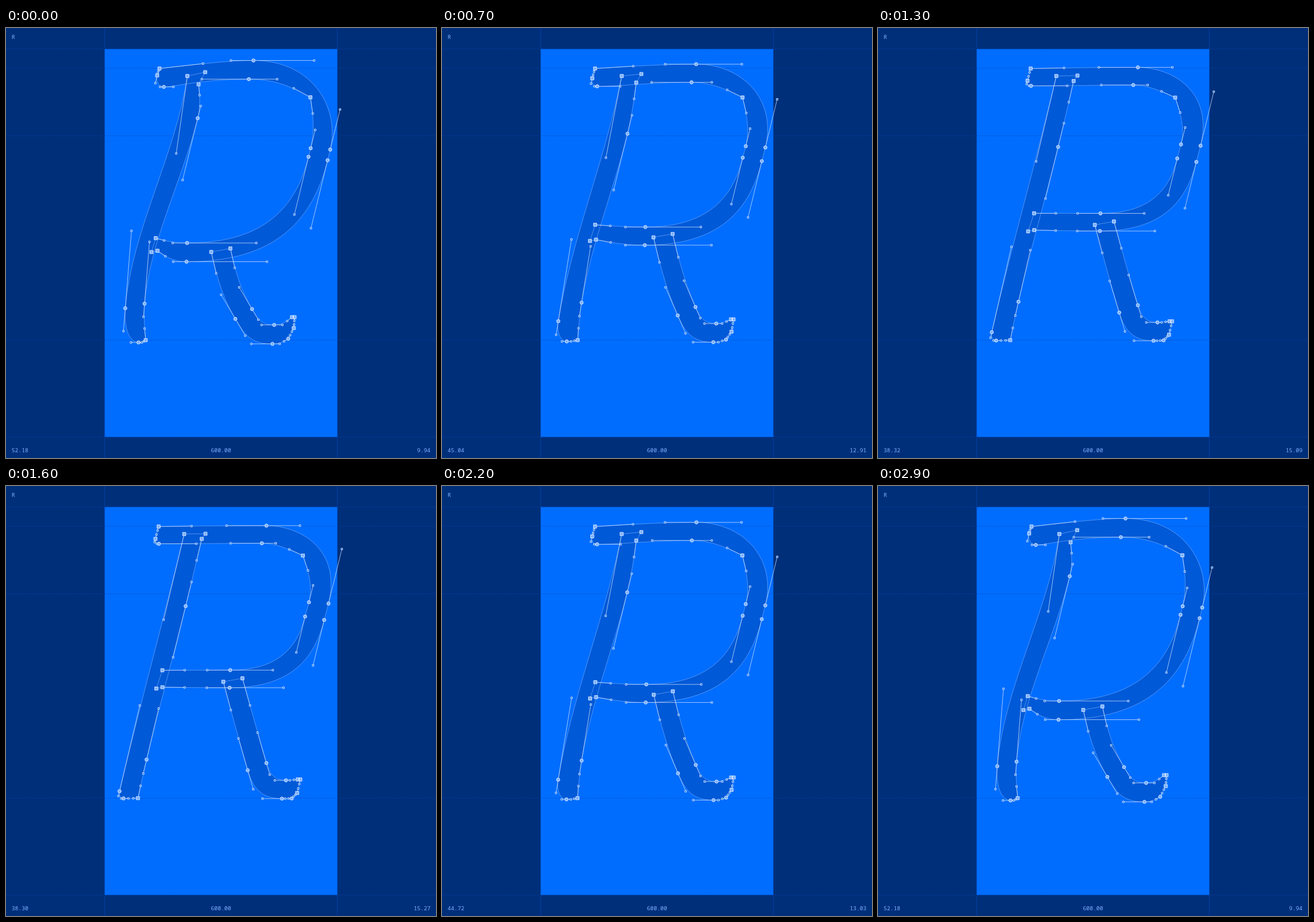
Write an HTML page that moves like this. It is 748 by 748 pixels and loops after 3 s.

```html
<!DOCTYPE html>
<html lang="en">
<head>
<meta charset="utf-8">
<title>Glyph outline</title>
<style>
  html, body { margin: 0; width: 100%; height: 100%; overflow: hidden; background: #002f7a; }
  svg { display: block; width: 100vw; height: 100vh; }
  text { font: 500 9.72px "Noto Sans Mono", "DejaVu Sans Mono", monospace; fill: #7fb0ff; }
  .guide { stroke: #0046ad; stroke-width: .75; fill: none; }
  .dots { stroke-dasharray: 1.5 1.5; }
  #fill { fill: #0059d7; }
  #outline { fill: none; stroke: #8fbcff; stroke-width: .75; stroke-opacity: .75; }
  #arms { fill: none; stroke: #d6e6ff; stroke-width: .75; }
  #grips { fill: #0060e6; stroke: #fff; stroke-width: .8; }
  #nodes { fill: #7ab0ff; stroke: #e6f0ff; stroke-width: .9; }
</style>
</head>
<body>
<svg viewBox="0 0 748 748">
  <rect width="748" height="748" fill="#002f7a"/>
  <rect x="171.5" y="36.5" width="405" height="675" fill="#006dff"/>
  <path class="guide" d="M171.5 0V748M576.5 0V748"/>
  <path class="guide dots" d="M0 36.5H748M0 70H748M0 187.5H748M0 543H748M0 711.5H748"/>
  <g id="fill"></g>
  <path id="outline"/>
  <path id="arms"/>
  <path id="grips"/>
  <path id="nodes"/>
  <text x="9.7" y="19">R</text>
  <text id="left" x="9.7" y="738"></text>
  <text x="374" y="738" text-anchor="middle">600.00</text>
  <text id="right" x="738.3" y="738" text-anchor="end"></text>
</svg>
<script>
const $ = id => document.getElementById(id);
const mix = (a, b, k) => a + (b - a) * k;
const mixPt = (p, q, k) => [mix(p[0], q[0], k), mix(p[1], q[1], k)];
const shift = ([x, y], dx, dy) => [x + dx, y + dy];

// Node kinds. A lean is the sideways run per unit of height; without one the tangent is free.
const corner = (at, lean) => ({ at, lean });
const round = (at, lean) => ({ at, lean, smooth: true });
const flat = at => ({ at, flat: true, smooth: true });
// How the segment arriving at a node differs from a plain curve.
const line = node => ({ ...node, line: true });
const pulled = node => ({ ...node, pulled: true });

// The letter as three strokes; k blends from the bent form to the straight one.
function letter(k) {
  const p = (x, y, dx, dy) => [x + dx * k, y + dy * k];
  const pen = mix(32.5, 30.6, k);
  const slant = .245, foot = mix(.08, .236, k), kick = mix(-.59, -.29, k);

  const top = p(430.5, 56.5, 22.5, 12.5), bottom = p(314, 406.5, 75, -55.6);
  const upper = p(564, 211.5, -3, -7), lower = p(559.5, 230, -6, 3);
  const tail = p(263.5, 387.5, 8.5, -37.5);
  const bowl = [
    corner(p(267, 70.5, -1.5, 0)),
    pulled(flat(top)),
    pulled(round(upper, slant)),
    line(round(lower, slant)),
    flat(bottom),
    corner(tail),
    line(corner(shift(tail, -10.5, 2.3))),
    line(corner(p(260.5, 365.5, 11.5, -45))),
    flat(shift(bottom, 1, -pen)),
    round(shift(lower, -33.2, -6), slant),
    line(round(shift(upper, -34, -2.3), slant)),
    corner(p(529.5, 120.5, -13, .5)),
    flat(shift(top, -8, pen)),
    pulled(flat(p(274.5, 102.5, -8.5, -2))),
    corner(p(263, 82.5, -3, 9.5), slant)
  ];

  const stem = [
    line(corner(p(315.5, 83.5, -5.5, 0), mix(.144, .24, k))),
    round(p(207.5, 487.5, -10, 43.5), foot),
    flat(p(230.5, 547, -26, -3.5)),
    corner(p(243, 543, -13.5, 0)),
    round(p(241, 479.5, 3.5, -3.5), foot),
    round(p(333.5, 157, -21, 52), slant),
    corner(p(335, 98, 5.5, -6)),
    line(corner(p(346.5, 76.8, .5, 6.2)))
  ];

  const hip = p(357, 389.5, 21, -49), tip = p(502, 503, 10, 7.5);
  const leg = [
    line(corner(hip)),
    round(p(399, 506, 21.5, -11.5), kick),
    flat(p(463.5, 549.5, 16.5, -5.7)),
    round(p(491, 540.5, 6, 3)),
    corner(p(500.5, 522, 6, 12)),
    corner(tip),
    line(corner(shift(tip, -4.5, 0))),
    flat(p(466.5, 516.5, 20.5, -4.5)),
    round(p(428, 489, 25, -7), kick),
    corner(shift(hip, 33.3, -6))
  ];
  return [bowl, stem, leg];
}

const isFree = n => !n.flat && n.lean === undefined;

// Share of the way to the far node that a handle covers along its tangent.
function reach(n, far, k) {
  if (isFree(far)) return n.flat ? mix(.46, .34, k) : .36;
  if (!n.flat === !far.flat) return 1 / 3;
  return n.flat ? .57 : .67;
}

function handle(n, far, share) {
  const [x, y] = n.at;
  if (n.flat) return [mix(x, far.at[0], share), y];
  const dy = (far.at[1] - y) * share;
  return [x - n.lean * dy, y + dy];
}

// Two handles of a curve; a free end aims at the handle of the other end.
function handles(a, b, k) {
  if (isFree(a) && isFree(b)) return [mixPt(a.at, b.at, 1 / 3), mixPt(a.at, b.at, 2 / 3)];
  const pull = b.pulled ? mix(.22, -.03, k) : 0;
  let h1 = isFree(a) ? null : handle(a, b, reach(a, b, k) + pull);
  let h2 = isFree(b) ? null : handle(b, a, reach(b, a, k) - pull);
  h1 = h1 || mixPt(a.at, h2, .5 + pull / 2);
  h2 = h2 || mixPt(b.at, h1, .5);
  return [h1, h2];
}

const square = ([x, y], r) => `M${x - r} ${y - r}h${2 * r}v${2 * r}h${-2 * r}z`;
const circle = ([x, y], r) => `M${x - r} ${y}a${r} ${r} 0 1 0 ${2 * r} 0a${r} ${r} 0 1 0 ${-2 * r} 0z`;

const fills = letter(0).map(() =>
  $('fill').appendChild(document.createElementNS($('fill').namespaceURI, 'path')));

function draw(k) {
  let outline = '', arms = '', grips = '', nodes = '';
  letter(k).forEach((stroke, n) => {
    let d = 'M' + stroke[0].at;
    stroke.forEach((a, i) => {
      const b = stroke[(i + 1) % stroke.length];
      if (b.line) {
        d += 'L' + b.at;
      } else {
        const [h1, h2] = handles(a, b, k);
        d += `C${h1} ${h2} ${b.at}`;
        arms += `M${a.at}L${h1}M${b.at}L${h2}`;
        grips += square(h1, 1.4) + square(h2, 1.4);
      }
      nodes += a.smooth ? circle(a.at, 2.9) : square(a.at, 2.8);
    });
    fills[n].setAttribute('d', d + 'Z');
    outline += d + 'Z';
  });
  Object.entries({ outline, arms, grips, nodes }).forEach(([id, d]) => $(id).setAttribute('d', d));

  // Side bearings in font units
  $('left').textContent = Math.max(38.3, 52.18 - 13.1 * k - 1.4 * k * k).toFixed(2);
  $('right').textContent = (9.94 + 6.2 * k - .87 * k * k).toFixed(2);
}

const start = performance.now();
let shown = -1;
function tick() {
  const step = Math.floor(Math.max(0, performance.now() - start) % 3000 / 100);
  if (step !== shown) {
    shown = step;
    const rise = step / 14.8, fall = (29 - step) / 14.2;
    draw(Math.min(rise, fall) * 14.2 / 13);
  }
  requestAnimationFrame(tick);
}
tick();
</script>
</body>
</html>
```
